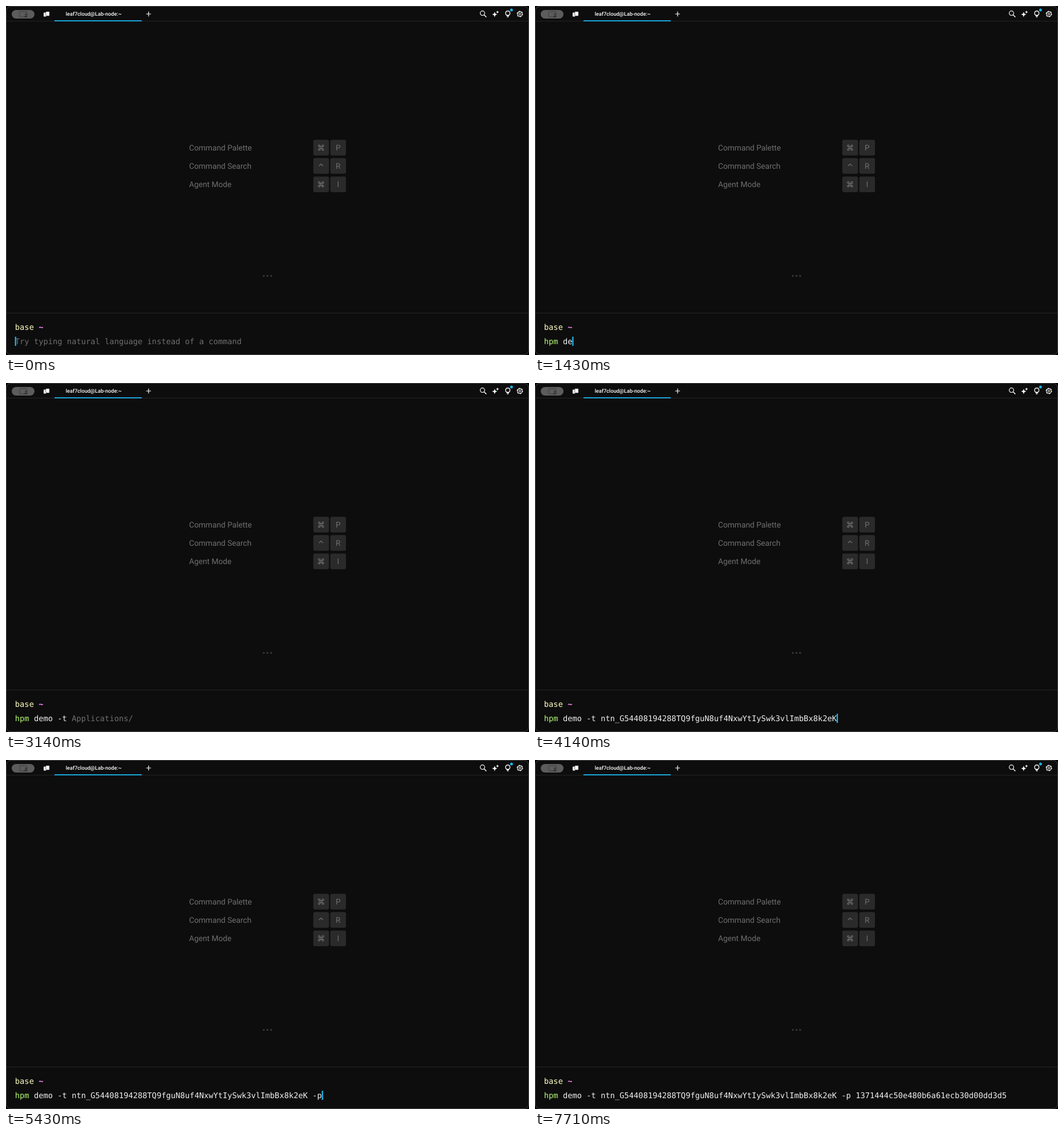
An HTML page for the animation above (8000 ms loop, 917 px wide and 611 px high).

```html
<!DOCTYPE html>
<html lang="en">
<head>
<meta charset="utf-8">
<title>Terminal session</title>
<style>
  html, body { margin: 0; width: 100%; height: 100%; overflow: hidden; background: #000; }
  svg { display: block; width: 917px; height: 611px; }
  text { white-space: pre; text-rendering: geometricPrecision; font: 13.75px Roboto, sans-serif; }
  .mono { font-family: "DejaVu Sans Mono", monospace; fill: #f1f1f1; }
  .tab { font-size: 9.15px; font-weight: 500; fill: #fff; }
  .dim { fill: #6f6f6f; }
  .key { fill: #2a2a2a; }
  .line { fill: none; stroke: #fff; stroke-width: 1.2; }
  .glyph { fill: none; stroke: #777; stroke-width: 1.1; }
  .accent { fill: #19b5ec; }
</style>
</head>
<body>
<svg viewBox="0 0 917 611">
  <rect x=".5" y=".5" width="916" height="610" rx="8" fill="#0d0d0d" stroke="#484848"/>
  <path d="M1 26.5H916M1 537.5H916" stroke="#242424"/>

  <!-- header -->
  <rect x="10" y="7" width="40" height="15" rx="7.5" fill="#5c5c5c"/>
  <g fill="#333">
    <rect x="24" y="10" width="13" height="9" rx="1" fill="none" stroke="#3d3d3d"/>
    <circle cx="34.8" cy="14.6" r="1.5"/>
    <path d="M32 19.5a2.8 2.8 0 0 1 5.6 0z"/>
  </g>
  <rect x="66" y="11.5" width="4.5" height="7" rx=".8" fill="#fff"/>
  <rect x="69.8" y="9.8" width="6.4" height="7.6" rx=".8" fill="#fff" stroke="#0d0d0d" stroke-width=".6"/>
  <text class="tab" x="153.8" y="17.2" text-anchor="middle">leaf7cloud@Lab-node:~</text>
  <rect class="accent" x="85" y="25" width="153" height="1.8"/>
  <path class="line" d="M245.8 14H254.2M250 9.8V18.2"/>
  <g class="line">
    <circle cx="835.4" cy="12.6" r="3.9"/>
    <path d="M838.3 15.5L842.3 19.5" stroke-width="1.5"/>
    <path d="M877.8 16.2C875 14.4 875.2 8.8 879.8 8.7C884.4 8.8 884.6 14.4 881.8 16.2ZM877.8 17.4H881.8M878.4 19.2H881.2"/>
    <circle cx="901" cy="14" r="4.2"/>
    <circle cx="901" cy="14" r="4.9" stroke-dasharray="2.2 2.93"/>
    <circle cx="901" cy="14" r="1.6" stroke-width="1"/>
  </g>
  <path fill="#fff" d="M856.8 10.2l1.3 3.3 3.3 1.3-3.3 1.3-1.3 3.3-1.3-3.3-3.3-1.3 3.3-1.3zM861.7 8l.8 1.8 1.8.8-1.8.8-.8 1.8-.8-1.8-1.8-.8 1.8-.8z"/>
  <circle class="accent" cx="886.3" cy="7" r="2.5"/>

  <!-- shortcuts -->
  <defs>
    <path id="cmd" class="glyph" d="M-1.7-1.7H1.7V1.7H-1.7ZM-1.7-1.7H-3.2A1.5 1.5 0 1 1-1.7-3.2ZM1.7-1.7V-3.2A1.5 1.5 0 1 1 3.2-1.7ZM1.7 1.7H3.2A1.5 1.5 0 1 1 1.7 3.2ZM-1.7 1.7V3.2A1.5 1.5 0 1 1-3.2 1.7Z"/>
    <path id="ctrl" class="glyph" d="M-3.6 0L0-3.6L3.6 0"/>
  </defs>
  <g id="shortcuts"></g>
  <g fill="#383838">
    <circle cx="452" cy="472.5" r="1.7"/>
    <circle cx="458.4" cy="472.5" r="1.7"/>
    <circle cx="464.8" cy="472.5" r="1.7"/>
  </g>

  <!-- prompt -->
  <text class="mono" x="15.8" y="567"><tspan fill="#fefdc2">base </tspan><tspan fill="#ff8ffd" font-weight="bold">~</tspan></text>
  <text class="mono" x="15.8" y="591.5"><tspan id="command"></tspan><tspan id="args"></tspan><tspan id="hint" class="dim"></tspan></text>
  <rect id="cursor" class="accent" y="579" width="2.3" height="16"/>
</svg>
<script>
const $ = id => document.getElementById(id);
const LOOP = 8000, CELL = 8.278, LEFT = 15.8;

$('shortcuts').innerHTML = [
  ['Command Palette', 'cmd', 'P'],
  ['Command Search', 'ctrl', 'R'],
  ['Agent Mode', 'cmd', 'I'],
].map(([label, modifier, key], row) => `
  <g transform="translate(0 ${248 + row * 32.1})">
    <text class="dim" x="321" y="4.7">${label}</text>
    <rect class="key" x="538.8" y="-13.8" width="27.5" height="27.5" rx="3"/>
    <rect class="key" x="568.6" y="-13.8" width="27.5" height="27.5" rx="3"/>
    <use href="#${modifier}" x="552.4"/>
    <text class="dim" x="582.3" y="4.7" text-anchor="middle">${key}</text>
  </g>`).join('');

// [time, text added, suggestion]
const keys = [
  [0, '', 'Try typing natural language instead of a command'],
  [140, 'h', 'pm --help'],
  [290, 'p', 'm --help'],
  [430, 'm', ' --help'],
  [860, ' ', '--help'],
  [1290, 'd'], [1430, 'e'], [1570, 'mo'], [1710, ' '], [1860, '-'], [2000, 't'],
  [2140, ' ', 'Applications/'],
  [4140, 'ntn_G54408194288TQ9fguN8uf4NxwYtIySwk3vlImbBx8k2eK'],
  [4860, ' ', 'Applications/'],
  [5140, '-'], [5430, 'p'],
  [5710, ' ', 'Applications/'],
  [7430, '1371444c50e480b6a61ecb30d00dd3d5'],
];
// Spans in which the cursor is blinked off
const blinks = [[2430, 2710], [3140, 3430], [3710, 4140], [4570, 4860],
  [6000, 6430], [6710, 7000], [7710, LOOP]];

function draw() {
  const t = performance.now() % LOOP;
  const pressed = keys.filter(([time]) => time <= t);
  const typed = pressed.map(([, text]) => text).join('');
  $('command').textContent = typed.slice(0, 3);
  $('command').setAttribute('fill', t < 570 ? '#f1f1f1' : '#b4fa72');
  $('args').textContent = typed.slice(3);
  $('hint').textContent = pressed.at(-1)[2] || '';
  $('cursor').setAttribute('x', LEFT + typed.length * CELL - 0.2);
  $('cursor').style.opacity = blinks.some(([from, to]) => t >= from && t < to) ? 0 : 1;
  requestAnimationFrame(draw);
}
draw();
</script>
</body>
</html>
```
